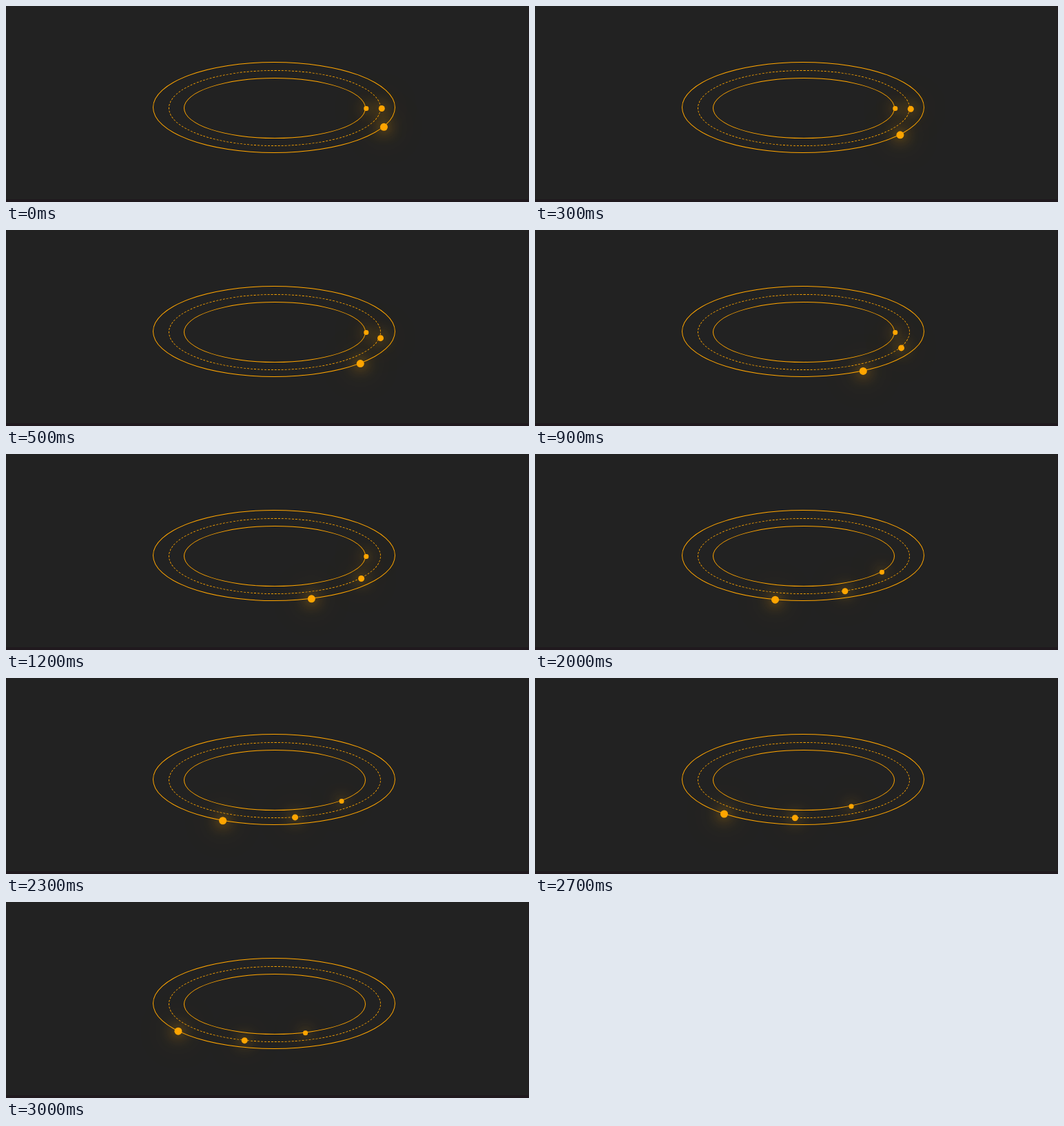
An HTML page for the animation above (3.1 s loop, 759 by 284 pixels).

```html
<!DOCTYPE html>
<html lang="en">
<head>
<meta charset="utf-8">
<title>Orbits</title>
<style>
  @property --t {
    syntax: "<number>";
    inherits: true;
    initial-value: 0;
  }

  html, body {
    margin: 0;
    width: 100%;
    height: 100%;
    overflow: hidden;
    background: #222;
  }

  .stage {
    position: relative;
    box-sizing: border-box;
    width: 759px;
    height: 284px;
    overflow: hidden;
    border: solid #20191e;
    border-width: 0 1px 4px 0;
    animation: clock 3.1s steps(31) -4ms infinite;
  }

  @keyframes clock {
    from { --t: 0; }
    to { --t: 3.1; }
  }

  .ring, .dot {
    position: absolute;
    box-sizing: border-box;
    border-radius: 50%;
  }

  .ring { border: 1px solid orange; }
  .ring.outer { left: 213px; top: 81px; width: 352px; height: 132px; }
  .ring.middle { left: 236px; top: 93px; width: 308px; height: 110px; border-style: dashed; }
  .ring.inner { left: 258px; top: 104px; width: 264px; height: 88px; }

  /* Each dot waits at the right end of its ring until --start seconds. */
  .dot {
    --angle: calc(max(0, var(--t) - var(--start)) * 39.2deg);
    left: calc(var(--cx) - var(--r));
    top: calc(var(--cy) - var(--r));
    width: calc(var(--r) * 2);
    height: calc(var(--r) * 2);
    background: orange;
    box-shadow: 0 0 20px orange, 0 0 50px orange;
    transform: translate(calc(cos(var(--angle)) * var(--rx)), calc(sin(var(--angle)) * var(--ry)));
  }
  .dot.outer { --start: -0.64; --cx: 389.3px; --cy: 147.6px; --rx: 175.5px; --ry: 65.5px; --r: 5.6px; }
  .dot.middle { --start: 0.28; --cx: 390.3px; --cy: 148.4px; --rx: 154.8px; --ry: 54.4px; --r: 4.6px; }
  .dot.inner { --start: 1.2; --cx: 390.3px; --cy: 148.5px; --rx: 132.3px; --ry: 43.8px; --r: 3.3px; }
</style>
</head>
<body>
<div class="stage">
  <div class="ring outer"></div>
  <div class="ring middle"></div>
  <div class="ring inner"></div>
  <div class="dot outer"></div>
  <div class="dot middle"></div>
  <div class="dot inner"></div>
</div>
</body>
</html>
```
